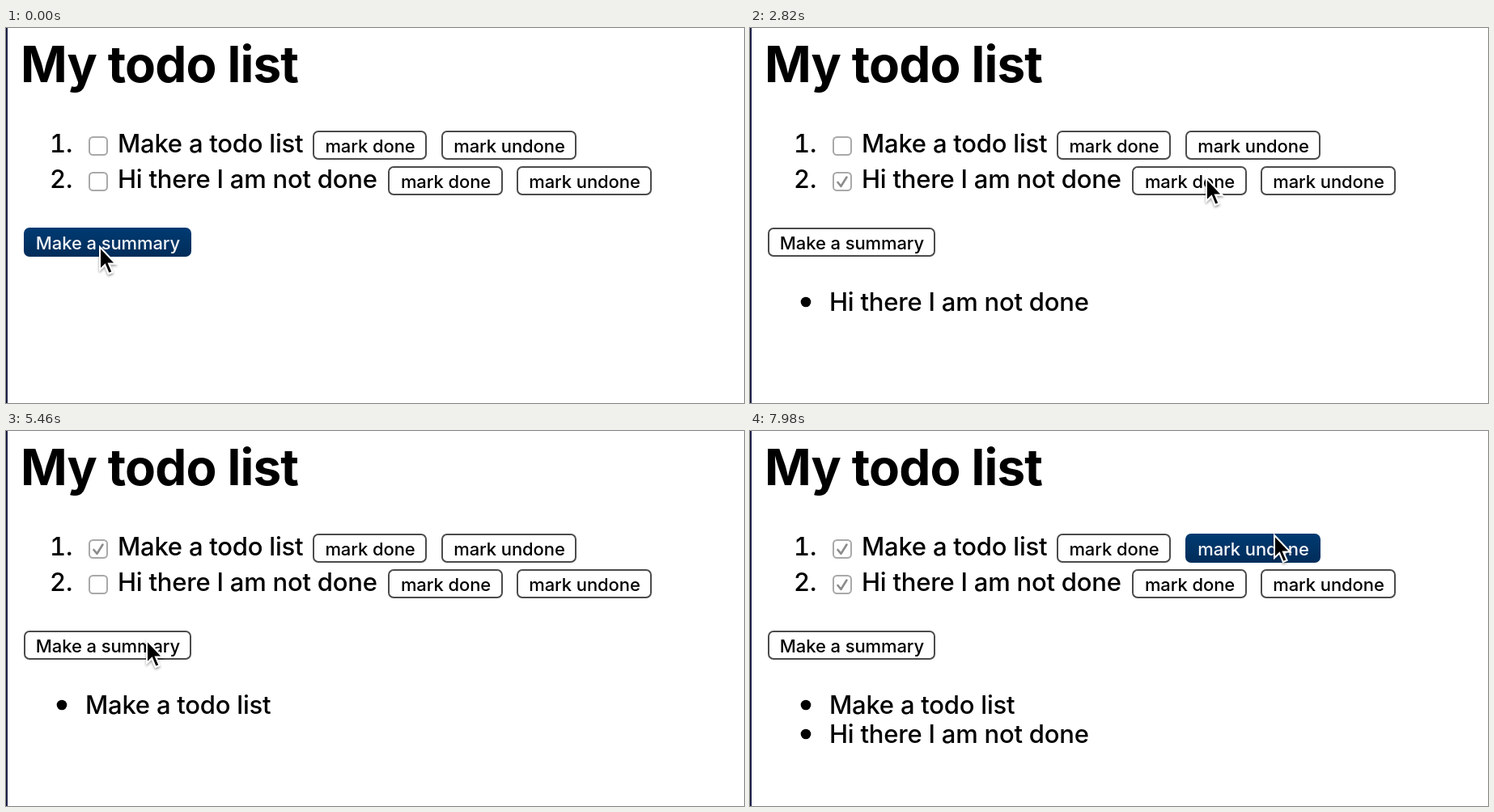
Write an HTML page that moves like this. It is 912 px wide and 464 px high and loops after 8 s.

```html
<!DOCTYPE html>
<html lang="en">
<head>
<meta charset="utf-8">
<title>Todo list</title>
<style>
html, body { margin: 0; width: 100%; height: 100%; overflow: hidden; background: #fff; }
svg { display: block; width: 912px; height: 464px; }
text { font-family: Inter, "Open Sans", sans-serif; font-weight: 450; fill: #000; }
.title { font-size: 62px; font-weight: 700; letter-spacing: -.85px; }
.item { font-size: 31px; letter-spacing: -.22px; }
.num { text-anchor: end; font-variant-numeric: tabular-nums; }
.button text { font-size: 22px; letter-spacing: -.1px; text-anchor: middle; }
.button rect { fill: #fff; stroke: #4b4b4b; stroke-width: 2; }
.button.down rect { fill: url(#press); stroke: url(#press); }
.button.down text { fill: #f4f6f9; }
.box rect { fill: #fff; stroke: #a9a9a9; stroke-width: 2; }
.box path { fill: none; stroke: #8c8c8c; stroke-width: 2.6; stroke-linecap: round; stroke-linejoin: round; visibility: hidden; }
.box.done path { visibility: visible; }
.box.live rect { stroke: #4b4b4b; }
.box.live.done rect { fill: #0d5aa7; stroke: #0d5aa7; }
.box.live.done path { stroke: #fff; }
</style>
</head>
<body>
<svg id="stage" viewBox="0 0 912 464">
  <defs>
    <linearGradient id="press" x1="0" y1="0" x2="0" y2="1">
      <stop offset="0" stop-color="#003a72"/>
      <stop offset="1" stop-color="#002d5a"/>
    </linearGradient>
    <filter id="shadow" x="-50%" y="-30%" width="200%" height="170%">
      <feDropShadow dx="0" dy="2" stdDeviation="1.8" flood-color="#000" flood-opacity=".4"/>
    </filter>
  </defs>
  <rect width="912" height="464" fill="#fff"/>
  <rect width="2" height="464" fill="#1d2148"/>
</svg>
<script>
const LOOP = 8000, STEP = 60, LIVE = 450;
const stage = document.getElementById('stage');
const labels = ['Make a todo list', 'Hi there I am not done'];

function add(parent, tag, attrs, text) {
  const node = document.createElementNS('http://www.w3.org/2000/svg', tag);
  for (const key in attrs) node.setAttribute(key, attrs[key]);
  if (text) node.textContent = text;
  return parent.appendChild(node);
}

function button(x, y, w, label) {
  const g = add(stage, 'g', { class: 'button' });
  add(g, 'rect', { x: x + 1, y: y + 1, width: w - 2, height: 34, rx: 6 });
  add(g, 'text', { x: x + w / 2 + .5, y: y + 27 }, label);
  return g;
}

function checkbox(y) {
  const g = add(stage, 'g', { class: 'box' });
  add(g, 'rect', { x: 103, y: y + 1, width: 22, height: 22, rx: 4.5 });
  add(g, 'path', { d: `M108.5 ${y + 13}l4 4.8 7-11.3` });
  return g;
}

add(stage, 'text', { x: 18, y: 67, class: 'title' }, 'My todo list');
const boxes = labels.map((label, i) => {
  const y = 154 + 44 * i;
  add(stage, 'text', { x: 82, y, class: 'item num' }, `${i + 1}.`);
  add(stage, 'text', { x: 138, y, class: 'item' }, label);
  return checkbox(y - 20);
});
const buttons = {
  done0: button(379, 127, 141, 'mark done'),
  undone0: button(538, 127, 167, 'mark undone'),
  done1: button(472, 171, 142, 'mark done'),
  undone1: button(631, 171, 167, 'mark undone'),
  summary: button(22, 247, 207, 'Make a summary')
};
const lines = labels.map((_, i) => {
  const g = add(stage, 'g', {});
  add(g, 'circle', { cx: 69, cy: 339 + 36 * i, r: 6.3 });
  add(g, 'text', { x: 98, y: 350 + 36 * i, class: 'item' });
  return g;
});
const cursor = add(stage, 'path', {
  d: 'M0 0V28L6.3 22 10.8 33 15.6 31 11 20.5H19.5Z',
  fill: '#000', stroke: '#fff', 'stroke-width': 2, filter: 'url(#shadow)'
});

// press time, release time, button
const clicks = [
  [0, 120, 'summary'],
  [1020, 1140, 'done1'],
  [1680, 1800, 'summary'],
  [3180, 3300, 'undone1'],
  [3840, 3960, 'summary'],
  [4860, 4980, 'done0'],
  [5280, 5400, 'summary'],
  [6480, 6600, 'done1'],
  [7020, 7140, 'summary'],
  [7920, 8040, 'undone0']
];

// start, end, target of each pointer move
const moves = [
  [0, 0, 116, 271],
  [300, 900, 570, 186],
  [1200, 1560, 152, 260],
  [2040, 2700, 564, 186],
  [2820, 3060, 757, 188],
  [3360, 3720, 110, 254],
  [4140, 4740, 450, 142],
  [5010, 5260, 174, 259],
  [5640, 6360, 572, 186],
  [6620, 6940, 104, 271],
  [7260, 7860, 648, 129]
];

function pointer(t) {
  let x = 0, y = 0;
  for (const [start, end, tx, ty] of moves) {
    if (t < start) break;
    const p = end > start ? Math.min(1, (t - start) / (end - start)) : 1;
    const e = p * p * (3 - 2 * p);
    x += (tx - x) * e;
    y += (ty - y) * e;
  }
  return [x, y];
}

function render(time) {
  const t = Math.floor(time % LOOP / STEP) * STEP;
  const done = [false, false], live = [false, false];
  let summary = [], pressed = '';

  for (const [down, up, name] of clicks) {
    if (t >= down && t < up) pressed = name;
    if (t < up) break;
    if (name === 'summary') {
      summary = labels.filter((_, i) => done[i]);
    } else {
      const i = +name.slice(-1);
      done[i] = name.startsWith('done');
      live[i] = t < up + LIVE;
    }
  }

  for (const name in buttons) buttons[name].classList.toggle('down', name === pressed);
  boxes.forEach((box, i) => {
    box.classList.toggle('done', done[i]);
    box.classList.toggle('live', live[i]);
  });
  lines.forEach((line, i) => {
    line.setAttribute('visibility', summary[i] ? 'visible' : 'hidden');
    line.lastChild.textContent = summary[i] || '';
  });
  cursor.setAttribute('transform', `translate(${pointer(t).join(' ')})`);
}

const origin = performance.now();
function tick() {
  render(performance.now() - origin);
  requestAnimationFrame(tick);
}
tick();
</script>
</body>
</html>
```
